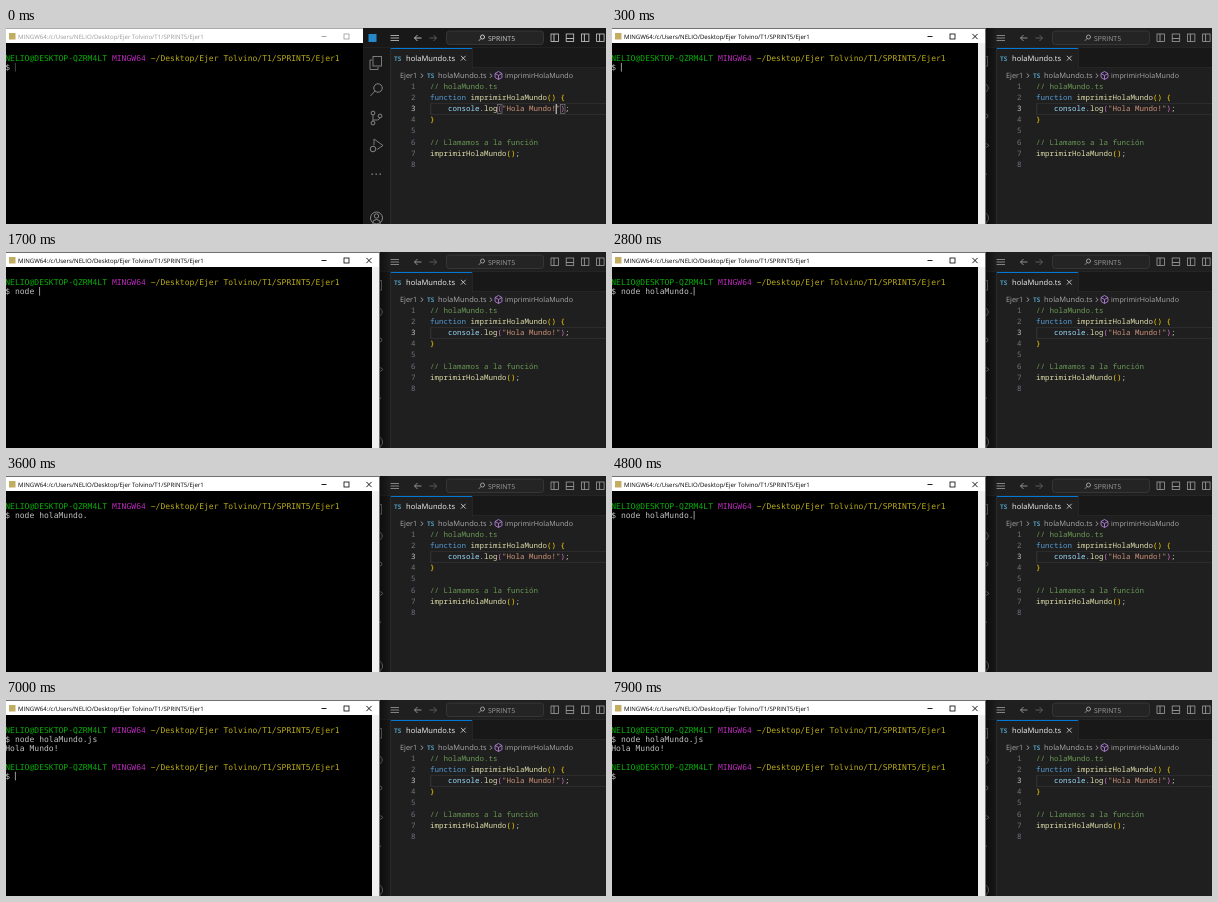
These frames come from a looping animation (600x196 px, 8000 ms). An HTML page with a canvas:

```html
<!DOCTYPE html>
<html lang="es">
<head>
<meta charset="utf-8">
<title>Hola Mundo</title>
<style>
html, body { margin: 0; width: 100%; height: 100%; overflow: hidden; background: #000; }
canvas { display: block; }
</style>
</head>
<body>
<canvas id="stage" width="600" height="196"></canvas>
<script>
const ctx = document.getElementById('stage').getContext('2d');
const LOOP = 8000, BLINK = 500;
const FOCUS = 300, COMPLETE = 2700, ENTER = 5500, OUTPUT = 5600, PROMPT = 6000;
const UI = '"Open Sans", "Noto Sans", sans-serif';
const CODE = '"Noto Sans Mono", "DejaVu Sans Mono", monospace';
const TERM = '"DejaVu Sans Mono", monospace';
const CODE_W = 4.5, CODE_ROW = 11.1, TERM_W = 4.85, TERM_ROW = 9.2, TERM_X = -0.8;
const USER = 'NELIO', HOST = 'DESKTOP-QZRM4LT', DIR = 'Desktop/Ejer Tolvino/T1/SPRINT5/Ejer1';
const GRAY = '#bfbfbf', GOLD = '#ffd700', PINK = '#da70d6', FN = '#dcdcaa', PLAIN = '#cccccc';
const COMMENT = '#6a9955', ICON = '#868686';

const SOURCE = [
  [['// holaMundo.ts', COMMENT]],
  [['function ', '#569cd6'], ['imprimirHolaMundo', FN], ['() {', GOLD]],
  [['    console', '#9cdcfe'], ['.', PLAIN], ['log', FN], ['(', PINK],
    ['"Hola Mundo!"', '#ce9178'], [')', PINK], [';', PLAIN]],
  [['}', GOLD]],
  [],
  [['// Llamamos a la función', COMMENT]],
  [['imprimirHolaMundo', FN], ['()', GOLD], [';', PLAIN]],
  []
];

function rect(x, y, w, h, color) {
  ctx.fillStyle = color;
  ctx.fillRect(x, y, w, h);
}

function box(x, y, w, h, color, width = 0.9) {
  ctx.strokeStyle = color;
  ctx.lineWidth = width;
  ctx.strokeRect(x, y, w, h);
}

function line(color, ...pts) {
  ctx.strokeStyle = color;
  ctx.lineWidth = 0.9;
  ctx.beginPath();
  for (let i = 0; i < pts.length; i += 2) ctx.lineTo(pts[i], pts[i + 1]);
  ctx.stroke();
}

function ring(x, y, r, color, from = 0) {
  ctx.strokeStyle = color;
  ctx.lineWidth = 1;
  ctx.beginPath();
  ctx.arc(x, y, r, from, Math.PI * 2);
  ctx.stroke();
}

function cross(x, y, r, color) {
  line(color, x - r, y - r, x + r, y + r);
  line(color, x + r, y - r, x - r, y + r);
}

function chevron(x, y, r, color, dir = 1) {
  line(color, x - r * dir, y - r, x, y, x - r * dir, y + r);
}

function arrow(x, y, dir, color) {
  line(color, x - 3.5, y, x + 3.5, y);
  chevron(x + 3.5 * dir, y, 3, color, dir);
}

function magnifier(x, y, r, color) {
  ring(x, y, r, color);
  line(color, x - r * 0.7, y + r * 0.7, x - r * 1.8, y + r * 1.9);
}

function cube(x, y, r, color) {
  const corner = i => [x + r * Math.sin(i * Math.PI / 3), y - r * Math.cos(i * Math.PI / 3)];
  line(color, ...[0, 1, 2, 3, 4, 5, 6].flatMap(corner));
  for (const i of [1, 3, 5]) line(color, x, y, ...corner(i));
}

// drawn at ten times the size, so that glyphs keep fractional advances
function text(str, x, y, size, family, color, weight = '') {
  ctx.save();
  ctx.translate(x, y);
  ctx.scale(0.1, 0.1);
  ctx.font = `${weight} ${size * 10}px ${family}`;
  ctx.textRendering = 'geometricPrecision';
  ctx.fillStyle = color;
  ctx.fillText(str, 0, 0);
  ctx.restore();
}

function runs(parts, x, y, size, family, step) {
  for (const [str, color] of parts) {
    text(str, x, y, size, family, color);
    x += str.length * step;
  }
}

function activityBar() {
  rect(357, 20, 27, 176, '#181818');
  box(367, 28.5, 8.5, 9.5, ICON);
  line(ICON, 366, 32, 364, 32, 364, 41.5, 372, 41.5, 372, 39);
  magnifier(372, 60, 4.2, ICON);
  for (const [x, y] of [[367, 85], [374, 88], [367, 95]]) ring(x, y, 1.9, ICON);
  line(ICON, 367, 87, 367, 93);
  line(ICON, 374, 90, 372, 92, 367, 92);
  line(ICON, 368, 117, 368, 111, 377, 117.5, 371, 121.5);
  ring(367, 121, 2.8, ICON);
  for (let i = -1; i <= 1; i++) rect(369.5 + i * 4, 145.5, 1.4, 1.4, ICON);
  ring(370.5, 190, 6, ICON);
  ring(370.5, 188, 2.2, ICON);
  ring(370.5, 195.5, 4, ICON, Math.PI);
}

function titleBar(active) {
  const ink = active ? '#cccccc' : '#9d9d9d';
  rect(357, 0, 243, 20, active ? '#181818' : '#1f1f1f');
  rect(357, 19.5, 243, 0.5, '#2b2b2b');
  rect(362.5, 6, 8, 8, '#2489ca');
  for (let i = -1; i <= 1; i++) rect(384.5, 9.6 + i * 2.5, 8.5, 0.8, ink);
  arrow(412, 10, -1, ink);
  arrow(427, 10, 1, '#606060');

  ctx.beginPath();
  ctx.roundRect(440.5, 3, 97, 13.5, 3);
  ctx.fillStyle = '#242424';
  ctx.fill();
  ctx.strokeStyle = '#3c3c3c';
  ctx.lineWidth = 0.8;
  ctx.stroke();
  magnifier(476.5, 9, 2, ink);
  text('SPRINT5', 482, 12.5, 6.9, UI, ink);

  // layout buttons
  for (let i = 0; i < 4; i++) {
    const x = 545 + i * 15.2;
    box(x, 6, 7.5, 7.5, ink, 0.8);
    if (i === 1) line(ink, x, 10.5, x + 7.5, 10.5);
    else line(ink, x + 3, 6, x + 3, 13.5);
  }
}

function tabs() {
  rect(466, 20, 134, 20, '#181818');
  rect(466, 39.3, 134, 0.7, '#2b2b2b');
  rect(466, 20, 0.7, 20, '#2b2b2b');
  rect(385, 20, 81, 1, '#0078d4');
  text('TS', 388, 32.5, 6.4, UI, '#519aba', 'bold');
  text('holaMundo.ts', 400, 32.8, 7.6, UI, '#f2f2f2');
  cross(457.3, 30.2, 2.4, PLAIN);

  const ink = '#a9a9a9';
  text('Ejer1', 394, 50.2, 7.3, UI, ink);
  text('TS', 421, 50.2, 6.4, UI, '#519aba', 'bold');
  text('holaMundo.ts', 432, 50.2, 7.5, UI, ink);
  text('imprimirHolaMundo', 499, 50.2, 7.12, UI, ink);
  for (const x of [417, 486]) chevron(x, 47.7, 2.2, ink);
  cube(492.5, 47.5, 4, '#b180d7');
}

function code(active) {
  for (const y of [75, 86]) rect(424, y, 176, 0.8, '#303030');
  rect(424.5, 76, 0.7, 10, '#404040');
  if (active) {
    for (const col of [15, 29]) box(424 + col * CODE_W, 76.5, CODE_W, 9, ICON, 0.6);
  }
  SOURCE.forEach((parts, i) => {
    const y = 61 + i * CODE_ROW;
    text(String(i + 1), 405, y, 7.5, CODE, i === 2 ? PLAIN : '#6e7681');
    runs(parts, 424, y, 7.5, CODE, CODE_W);
  });
  if (active) rect(549.7, 76, 1, 10, '#e0e0e0');
}

function editor(active) {
  rect(357, 0, 243, 196, '#1f1f1f');
  titleBar(active);
  activityBar();
  rect(384, 20, 1, 176, '#2b2b2b');
  tabs();
  code(active);
}

// letters of a word that are typed by time t, and the time of the last one
function type(word, start, step, t) {
  const n = Math.max(0, Math.min(word.length, Math.floor((t - start) / step) + 1));
  return { str: word.slice(0, n), last: n ? start + (n - 1) * step : 0 };
}

function command(t) {
  const parts = [type('node ', 1000, 160, t), type('ho', 2300, 200, t),
    type('laMundo.', COMPLETE, 0.01, t), type('js', 5000, 200, t)];
  return { str: parts.map(p => p.str).join(''), last: Math.max(FOCUS, ...parts.map(p => p.last)) };
}

function print(row, ...parts) {
  runs(parts, TERM_X, 33 + row * TERM_ROW, 8.05, TERM, TERM_W);
}

function prompt(row) {
  print(row, [`${USER}@${HOST} `, '#08ae08'], ['MINGW64 ', '#b92bb9'], ['~/' + DIR, '#b9aa18']);
}

function shell(t, active) {
  const { str, last } = command(t);
  let row = 1, col = str.length + 2, since = last;
  prompt(0);
  print(1, ['$ ' + str, GRAY]);
  if (t >= ENTER) [row, col, since] = [2, 0, ENTER];
  if (t >= OUTPUT) {
    print(2, ['Hola Mundo!', GRAY]);
    [row, since] = [3, OUTPUT];
  }
  if (t >= PROMPT) {
    prompt(4);
    print(5, ['$', GRAY]);
    [row, col, since] = [5, 2, PROMPT];
  }
  // the caret blinks from the last key press
  const on = !active || Math.floor((t - since) / BLINK) % 2 === 0;
  if (on) rect(TERM_X + col * TERM_W, 25.8 + row * TERM_ROW, 0.9, 8.6, active ? '#a8a8a8' : '#4a4a4a');
}

function terminal(t, active) {
  const width = active ? 374 : 357;
  const ink = active ? '#000000' : '#9a9a9a';
  rect(0, 0, width, 196, '#000000');
  rect(0, 0, width, 1, active ? '#707070' : '#aaaaaa');
  rect(0, 1, width, 14, '#ffffff');
  if (active) {
    rect(366, 15, 7, 181, '#f0f0f0');
    rect(373, 1, 1, 195, '#707070');
  }
  rect(3, 5, 6.5, 6.5, '#c3ad62');
  text(`MINGW64:/c/Users/${USER}/${DIR}`, 12, 10.7, 6.08, UI, ink);
  line(ink, 315.5, 8.5, 320.5, 8.5);
  box(338, 6, 5, 5, ink, 0.8);
  if (active) cross(363, 8.5, 2.6, ink);
  shell(t, active);
}

function shade() {
  const g = ctx.createLinearGradient(374, 0, 385, 0);
  g.addColorStop(0, 'rgba(0,0,0,0.45)');
  g.addColorStop(1, 'rgba(0,0,0,0)');
  rect(374, 0, 11, 196, g);
}

function draw(t) {
  const inShell = t >= FOCUS;
  editor(!inShell);
  if (inShell) shade();
  terminal(t, inShell);
}

const begin = performance.now();
function tick() {
  draw((performance.now() - begin) % LOOP);
  requestAnimationFrame(tick);
}
tick();
</script>
</body>
</html>
```
